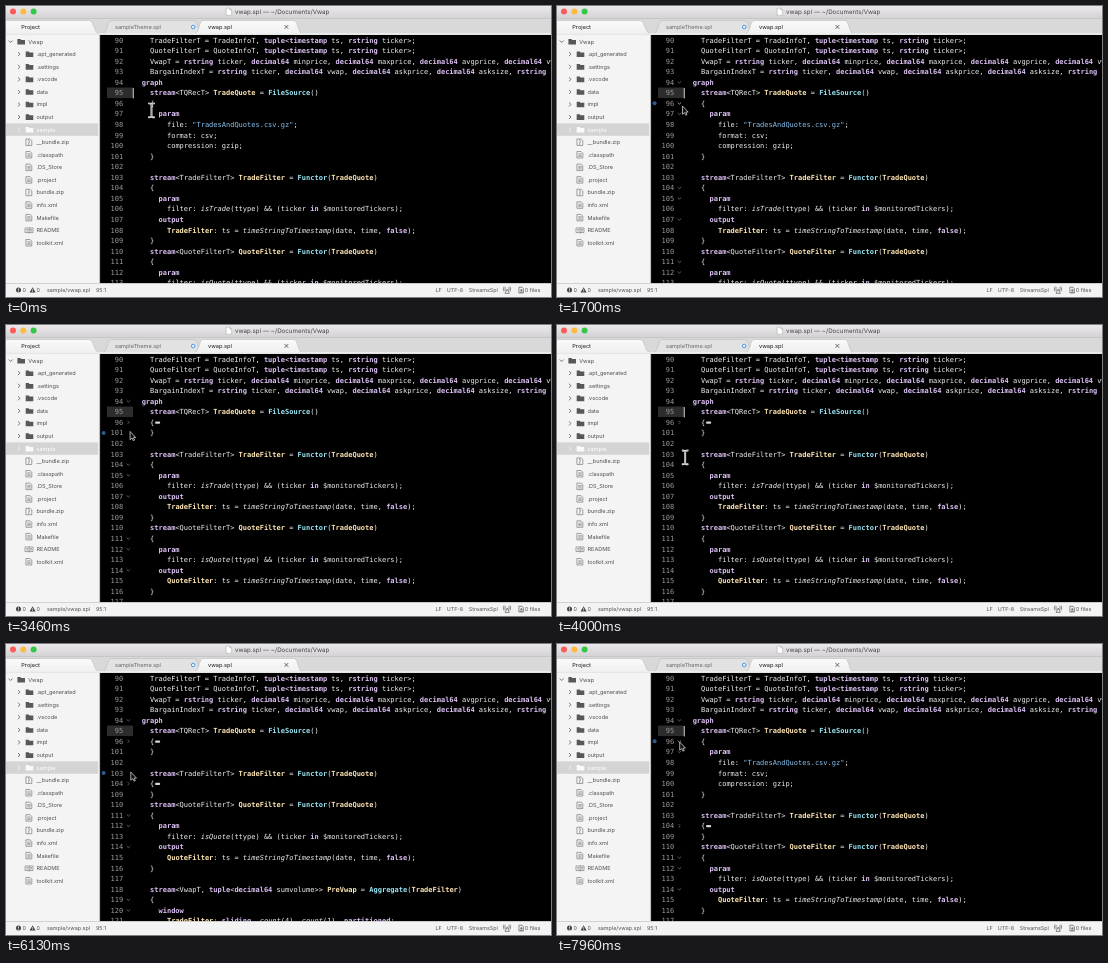
An HTML page for the animation above (8 s loop, 545 px wide and 291 px high).

```html
<!DOCTYPE html>
<html lang="en">
<head>
<meta charset="utf-8">
<title>Code folding</title>
<style>
  html, body { margin: 0; width: 100%; height: 100%; overflow: hidden; background: #000; }
  svg { display: block; }
  text { white-space: pre; text-rendering: geometricPrecision; }
  .ui { font-family: Inter, "Open Sans", sans-serif; font-size: 5.55px; fill: #505050; }
  .code { font-family: "DejaVu Sans Mono", monospace; font-size: 7.01px; fill: #f0f0f0; }
  .num { fill: #9a9a9a; text-anchor: end; }
  .keyword { font-weight: bold; fill: #dcc0f4; }
  .stream { font-weight: bold; fill: #ffe6b4; }
  .operator { font-weight: bold; fill: #98e6f4; }
  .call { font-style: italic; }
  .string { fill: #86c2f0; }
  .line { fill: none; stroke-linecap: round; stroke-linejoin: round; }
</style>
</head>
<body>
<svg id="stage" width="545" height="291" viewBox="0 0 545 291">
  <defs>
    <linearGradient id="titleFill" x2="0" y2="1">
      <stop stop-color="#eae8ea"/><stop offset="1" stop-color="#d3d1d3"/>
    </linearGradient>
    <linearGradient id="tabFill" x2="0" y2="1">
      <stop stop-color="#fafafa"/><stop offset="1" stop-color="#f0f0f0"/>
    </linearGradient>
  </defs>
  <g id="editor"></g>
  <g id="chrome"></g>
  <g id="arrow">
    <path d="M0 0V8.3L1.9 6.6L3.2 9.2L4.5 8.6L3.3 6.1H5.7Z" fill="#111" stroke="#dcdcdc" stroke-width=".75" stroke-linejoin="round"/>
  </g>
  <g id="beam" class="line">
    <path d="M-2.5 -6.9Q0 -6.9 0 -5.4V5.4Q0 6.9 -2.5 6.9M2.5 -6.9Q0 -6.9 0 -5.4M2.5 6.9Q0 6.9 0 5.4" stroke="#f4f4f4" stroke-width="1.9"/>
    <path d="M-2.3 -6.9Q0 -6.9 0 -5.4V5.4Q0 6.9 -2.3 6.9M2.3 -6.9Q0 -6.9 0 -5.4M2.3 6.9Q0 6.9 0 5.4" stroke="#444" stroke-width=".4"/>
  </g>
</svg>
<script>
const LOOP = 8000, ROW = 10.56, FIRST_LINE = 90, FIRST_Y = 34, ROWS = 24, CODE_X = 127.2;
const GUTTER_EDGE = 127;
const byId = id => document.getElementById(id);
const rowY = row => FIRST_Y + row * ROW;

function add(parent, tag, attrs = {}, text) {
  const node = document.createElementNS("http://www.w3.org/2000/svg", tag);
  for (const name in attrs) node.setAttribute(name, attrs[name]);
  if (text !== undefined) node.textContent = text;
  return parent.appendChild(node);
}
const rect = (parent, x, y, width, height, fill, more) =>
  add(parent, "rect", { x, y, width, height, fill, ...more });
const path = (parent, d, stroke, width = .7, more) =>
  add(parent, "path", { d, stroke, "stroke-width": width, class: "line", ...more });
const label = (parent, x, y, text, more) => add(parent, "text", { x, y, class: "ui", ...more }, text);
const show = (node, on) => { node.style.display = on ? "" : "none"; };

// ---- Source code ----
const SOURCE = `    TradeFilterT = TradeInfoT, tuple<timestamp ts, rstring ticker>;
    QuoteFilterT = QuoteInfoT, tuple<timestamp ts, rstring ticker>;
    VwapT = rstring ticker, decimal64 minprice, decimal64 maxprice, decimal64 avgprice, decimal64 vwap;
    BargainIndexT = rstring ticker, decimal64 vwap, decimal64 askprice, decimal64 asksize, rstring date;
  graph
    stream<TQRecT> TradeQuote = FileSource()
    {
      param
        file: "TradesAndQuotes.csv.gz";
        format: csv;
        compression: gzip;
    }

    stream<TradeFilterT> TradeFilter = Functor(TradeQuote)
    {
      param
        filter: isTrade(ttype) && (ticker in $monitoredTickers);
      output
        TradeFilter: ts = timeStringToTimestamp(date, time, false);
    }
    stream<QuoteFilterT> QuoteFilter = Functor(TradeQuote)
    {
      param
        filter: isQuote(ttype) && (ticker in $monitoredTickers);
      output
        QuoteFilter: ts = timeStringToTimestamp(date, time, false);
    }

    stream<VwapT, tuple<decimal64 sumvolume>> PreVwap = Aggregate(TradeFilter)
    {
      window
        TradeFilter: sliding, count(4), count(1), partitioned;`.split("\n");

const TOKENS = new RegExp([
  '(?<string>"[^"]*")',
  "(?<keyword>\\b(?:stream|tuple|graph|param|output|window|rstring|decimal64|timestamp|in|false|sliding|partitioned)\\b)",
  "(?<operator>\\b(?:FileSource|Functor|Aggregate)\\b)",
  "(?<stream>\\b(?:TradeQuote|TradeFilter|QuoteFilter|PreVwap)\\b)",
  "(?<call>\\b(?:isTrade|isQuote|timeStringToTimestamp|count)\\b)"
].join("|"), "g");

function drawCode(parent, y, code) {
  const indent = code.search(/\S/);
  if (indent < 0) return;
  const text = add(parent, "text", { x: CODE_X + indent * 4.22, y: y + 2.5, class: "code" });
  const body = code.trim();
  let end = 0;
  for (const match of body.matchAll(TOKENS)) {
    const kind = Object.keys(match.groups).find(name => match.groups[name]);
    add(text, "tspan", {}, body.slice(end, match.index));
    add(text, "tspan", { class: kind }, match[0]);
    end = match.index + match[0].length;
  }
  add(text, "tspan", {}, body.slice(end));
}

// Last hidden line for each block that gets folded
const FOLD_END = { 96: 100, 104: 108 };

function buildView(start, folds) {
  const root = add(byId("editor"), "g");
  const chevrons = [];
  for (let row = 0, n = FIRST_LINE; row < ROWS && n - FIRST_LINE < SOURCE.length; row++, n++) {
    const code = SOURCE[n - FIRST_LINE], y = rowY(row), folded = folds.includes(n);
    if (n === 95) rect(root, 101, y - ROW / 2, 26, ROW, "#2c2c2c");
    add(root, "text", { x: 117.2, y: y + 2.5, class: "code num" }, n);
    drawCode(root, y, code);
    if (/^\s*(graph|\{|param|output|window)$/.test(code)) {
      const d = folded ? `M121.8 ${y - 1.4}l1.4 1.4l-1.4 1.4` : `M120.9 ${y - .6}l1.5 1.4l1.5 -1.4`;
      chevrons.push({ row, folded, node: path(root, d, "#808080", .7) });
    }
    if (folded) {
      rect(root, 149.1, y - .9, 5, 2.4, "#d6d6d6", { rx: .8 });
      n = FOLD_END[n];
    }
  }
  return { start, root, chevrons };
}

rect(byId("editor"), 94, 28, 451, 250, "#000");
const views = [
  buildView(0, []),
  buildView(2530, [96]),
  buildView(5300, [96, 104]),
  buildView(7330, [104])
];
const caret = rect(byId("editor"), 126.8, 82, .9, 10.4, "#e8e8e8");
const dot = add(byId("editor"), "circle", { cx: 97.6, r: 2, fill: "#2c5c92" });

// ---- Window frame ----
const chrome = byId("chrome");

function drawTop() {
  rect(chrome, 0, 0, 545, 13, "url(#titleFill)");
  ["#fc5b57", "#fdbc40", "#34c84a"].forEach((fill, i) =>
    add(chrome, "circle", { cx: 7 + i * 10.3, cy: 5.6, r: 3, fill }));
  path(chrome, "M220.4 2.2h3.4l1.8 1.8v5.2h-5.2zM223.8 2.2v1.8h1.8", "#a9a9a9", .5, { style: "fill:#fff" });
  label(chrome, 229, 8.1, "vwap.spl — ~/Documents/Vwap", { style: "font-size:6.2px;fill:#454545" });
  rect(chrome, 0, 12.6, 545, 16, "#d9d9d9");
  rect(chrome, 0, 12.4, 545, .6, "#bdbdbd");
  const tab = (d, fill) => path(chrome, d, "#bcbcbc", .6, { style: `fill:${fill}` });
  tab("M97 27.5C101 27.5 101 14.5 105 14.5H188C192 14.5 192 27.5 196 27.5", "#e2e2e2");
  tab("M189 27.5C193 27.5 193 14.5 197 14.5H288C292 14.5 292 27.5 296 27.5", "url(#tabFill)");
  tab("M-2 27.5V14.5H83C88 14.5 88 27.5 93 27.5", "url(#tabFill)");
  rect(chrome, 0, 27.2, 545, 1.7, "#f0f0f0");
  label(chrome, 15.3, 22.7, "Project", { style: "font-weight:500;fill:#333" });
  label(chrome, 109, 22.7, "sampleTheme.spl", { style: "fill:#666" });
  add(chrome, "circle", { cx: 187.2, cy: 21, r: 1.8, fill: "#e9f3fd", stroke: "#3d8fe0", "stroke-width": .9 });
  label(chrome, 202, 22.7, "vwap.spl", { style: "font-weight:500;fill:#333" });
  path(chrome, "M278.8 19.3l3.2 3.2m0 -3.2l-3.2 3.2", "#444", .8);
}

const TREE = ["Vwap", ".apt_generated", ".settings", ".vscode", "data", "impl", "output", "sample",
  "__bundle.zip", ".classpath", ".DS_Store", ".project", "bundle.zip", "info.xml", "Makefile", "README", "toolkit.xml"];

function drawFolder(x, y, fill) {
  add(chrome, "path", { d: `M${x} ${y - 2.7}h3l.8 1h3.8v4.6h-7.6z`, fill });
}
function drawFile(x, y, name) {
  if (name === "README") {
    path(chrome, `M${x - .6} ${y - 2.2}h7.6v4.6h-7.6zM${x + 3.2} ${y - 2.2}v5.2M${x + .7} ${y - .6}h1.3m2.4 0h1.3M${x + .7} ${y + .8}h1.3m2.4 0h1.3`, "#707070", .6);
    return;
  }
  path(chrome, `M${x + .3} ${y - 3.2}h3.8l1.7 1.7v4.8h-5.5z`, "#707070", .65);
  const detail = name.endsWith(".zip") ? `M${x + 2.7} ${y - 2.4}v1m.7 .4v1m-.7 .4v2`
    : `M${x + 1.6} ${y - .9}h2.7m-2.7 1.3h2.7m-2.7 1.3h2.7`;
  path(chrome, detail, "#707070", .6);
}

function drawSidebar() {
  rect(chrome, 0, 28.9, 93.6, 248.6, "#f4f4f5");
  rect(chrome, 93.2, 28.9, .9, 248.6, "#c9c9c9");
  TREE.forEach((name, i) => {
    const y = 35.6 + i * 12.57, selected = name === "sample";
    const ink = selected ? "#fafafa" : "#585858";
    if (selected) rect(chrome, 0, y - 6.2, 92.2, 12.4, "#d4d4d4");
    if (i === 0) {
      path(chrome, `M3 ${y - .8}l1.7 1.7l1.7 -1.7`, ink, .8);
      drawFolder(11.4, y, ink);
    } else if (i < 8) {
      path(chrome, `M12.3 ${y - 1.7}l1.7 1.7l-1.7 1.7`, ink, .8);
      drawFolder(19.7, y, ink);
    } else {
      drawFile(20, y, name);
    }
    label(chrome, i ? 30.5 : 22.2, y + 2, name, selected ? { style: "fill:#fff" } : {});
  });
}

function drawStatus() {
  rect(chrome, 0, 277.2, 545, 14, "#f3f3f3");
  rect(chrome, 0, 277, 545, .7, "#cfcfcf");
  const ink = "#444", y = 286.1;
  add(chrome, "circle", { cx: 12.5, cy: 284, r: 2.5, fill: ink });
  path(chrome, "M12.5 282.7v1.4m0 1.2v.1", "#fff", .7);
  add(chrome, "path", { d: "M26.6 281.2l3 5.3h-6z", fill: ink });
  path(chrome, "M26.6 283.2v1.3m0 1v.1", "#fff", .6);
  const items = [[16.4, "0"], [30.6, "0"], [41, "sample/vwap.spl"], [90, "95:1"],
    [429.5, "LF"], [440.7, "UTF-8"], [462.8, "StreamsSpl"], [518.8, "0 files"]];
  for (const [x, text] of items) label(chrome, x, y, text, { style: "font-size:5.4px" });
  path(chrome, "M501 283.4l-1.9 4h3.8zM499.2 281.6q-1 1.4 0 2.8m3.6 -2.8q1 1.4 0 2.8M497.9 280.8q-1.5 2.2 0 4.4m6.2 -4.4q1.5 2.2 0 4.4", ink, .6);
  path(chrome, "M513.3 281.2h2.7l1.4 1.4v4.4h-4.1zM515.3 283.3v2m-1 -1h2m-2 2h2", ink, .6);
}

drawSidebar();
drawTop();
drawStatus();

// ---- Motion: time, x, y of the pointer's hot spot ----
const POINTER = [
  [0, 145.5, 104.3], [500, 145.5, 104.3], [1330, 127.7, 101.2], [1370, 127.7, 101.2],
  [1460, 126.4, 100.3], [1670, 126.4, 100.3], [1700, 125.5, 100], [1930, 123.9, 99.2],
  [2170, 123.9, 99.2], [2260, 122.8, 98.5], [3200, 122.8, 98.5], [4030, 128.2, 132.5],
  [4660, 125.5, 141.5], [4970, 125.5, 141.5], [5160, 124.2, 141.2], [6000, 124.2, 141.2],
  [6130, 124.8, 128], [6660, 123.2, 99.3], [6970, 123.2, 99.3], [7060, 122.5, 99.1],
  [7930, 122.5, 99.1], [7955, 122.7, 98], [LOOP, 122.7, 98]
];

function pointerAt(t) {
  const i = POINTER.findIndex(key => key[0] > t);
  const [t0, x0, y0] = POINTER[i - 1], [t1, x1, y1] = POINTER[i];
  const p = (t - t0) / (t1 - t0), e = p * p * (3 - 2 * p);
  return [x0 + (x1 - x0) * e, y0 + (y1 - y0) * e];
}

function render(t) {
  const [x, y] = pointerAt(t);
  const inGutter = x < GUTTER_EDGE;
  const hoverRow = Math.round((y - FIRST_Y) / ROW);
  const view = views.findLast(v => v.start <= t);
  for (const v of views) show(v.root, v === view);
  for (const { node, row, folded } of view.chevrons) {
    show(node, inGutter || folded);
    node.style.stroke = inGutter && row === hoverRow ? "#d0d0d0" : "#808080";
  }
  show(caret, Math.floor((t + 200) / 400) % 2 === 0);
  show(dot, inGutter);
  dot.setAttribute("cy", rowY(hoverRow));
  show(byId("arrow"), inGutter);
  show(byId("beam"), !inGutter);
  byId(inGutter ? "arrow" : "beam").setAttribute("transform", `translate(${x.toFixed(2)} ${y.toFixed(2)})`);
}

const begin = performance.now();
function tick() {
  render((performance.now() - begin) % LOOP);
  requestAnimationFrame(tick);
}
tick();
</script>
</body>
</html>
```
